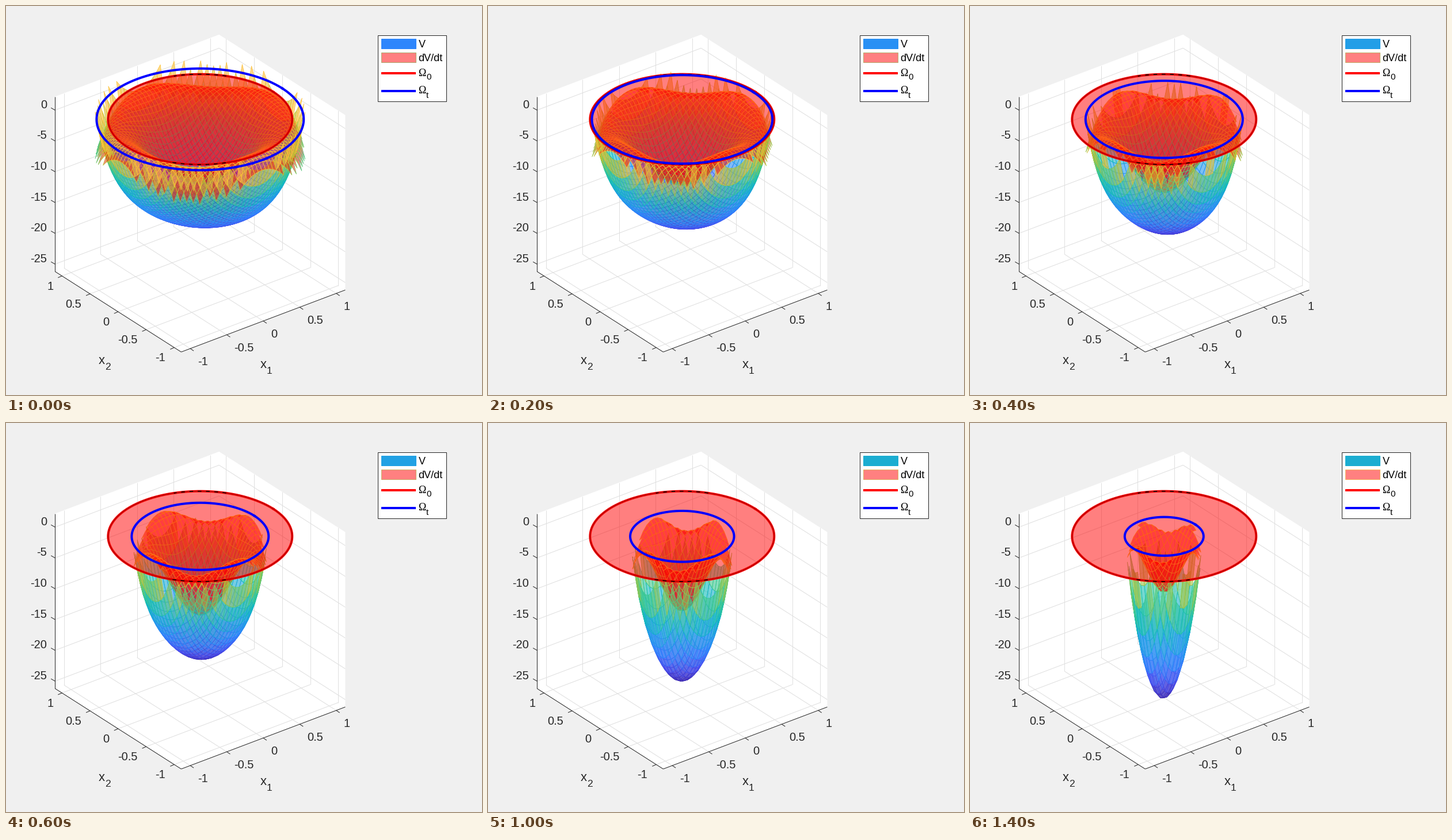
Recreate the animation shown at these times as a matplotlib script. Size 827 by 677 pixels, loop 1500 ms.

```python
import numpy as np
import matplotlib.pyplot as plt
from matplotlib.animation import FuncAnimation
from matplotlib.collections import LineCollection, PolyCollection
from matplotlib.colors import LinearSegmentedColormap
from matplotlib.patches import Polygon, Rectangle

W, H, DPI = 827, 677, 100
PX = 72 / DPI                      # one pixel in points
FRAMES, INTERVAL = 15, 100
INK, GRID = "#262626", "#dfdfdf"
LIM, ZLO, ZHI = 1.124, -26.2, 2.2

parula = LinearSegmentedColormap.from_list("parula", [
    (.243, .150, .660), (.282, .310, .950), (.180, .525, .990),
    (.132, .625, .900), (.070, .746, .726), (.290, .795, .515),
    (.750, .760, .190), (.995, .750, .235), (.977, .984, .082)])

plt.rcParams["font.family"] = "Liberation Sans"
fig = plt.figure(figsize=(W / DPI, H / DPI), dpi=DPI, facecolor="#f0f0f0")
ax = fig.add_axes([0, 0, 1, 1])
ax.set_xlim(0, W)
ax.set_ylim(H, 0)
ax.axis("off")


def project(x, y, z):
    """Orthographic view of data space, in pixels."""
    return np.stack([337.3 + 126.8 * x - 97.5 * y,
                     197.3 - 48.0 * x - 62.3 * y - 10.72 * z], axis=-1)


def view_plane(x, y):
    """Rightward and rearward coordinates as seen on screen."""
    return (126.8 * x - 97.5 * y) / 160, (48.0 * x + 62.3 * y) / 78.75


def text(x, y, s, px, ha="left", va="center", **kw):
    ax.text(x, y, s, fontsize=px * PX, ha=ha, va=va, color=kw.pop("color", INK), **kw)


def segment(a, b):
    return [project(*a), project(*b)]


def draw_box():
    corners = [(-LIM, LIM, ZHI), (LIM, LIM, ZHI), (LIM, -LIM, ZHI),
               (LIM, -LIM, ZLO), (-LIM, -LIM, ZLO), (-LIM, LIM, ZLO)]
    outline = [project(*c) for c in corners]
    ax.add_patch(Polygon(outline, fc="white", ec="none", zorder=0))

    grid = []
    for t in np.arange(-1, 1.1, .5):
        grid += [segment((t, -LIM, ZLO), (t, LIM, ZLO)),
                 segment((-LIM, t, ZLO), (LIM, t, ZLO)),
                 segment((t, LIM, ZLO), (t, LIM, ZHI)),
                 segment((LIM, t, ZLO), (LIM, t, ZHI))]
    for z in range(-25, 1, 5):
        grid += [segment((-LIM, LIM, z), (LIM, LIM, z)),
                 segment((LIM, LIM, z), (LIM, -LIM, z))]
    ax.add_collection(LineCollection(grid, colors=GRID, lw=PX, zorder=1))

    edges = [[outline[0], outline[5]], [outline[5], outline[4]],
             [outline[4], outline[3]]]
    for t in np.arange(-1, 1.1, .5):
        label = f"{t:g}"
        p = project(t, -LIM, ZLO)
        edges.append([p, p + (6, 4)])
        text(p[0] + 13, p[1] + 23, label, 20)
        p = project(-LIM, t, ZLO)
        edges.append([p, p + (-7, 3)])
        text(p[0] - 15, p[1] + 18.5, label, 20, "right")
    for z in range(-25, 1, 5):
        p = project(-LIM, LIM, z)
        edges.append([p, p + (-7, -4)])
        text(71, p[1] - 9, str(z), 20, "right")
    ax.add_collection(LineCollection(edges, colors=INK, lw=PX, zorder=2))

    for x, y, sub in [(442, 630, "1"), (161, 623, "2")]:
        text(x, y, "x", 22, va="baseline")
        text(x + 11, y + 10, sub, 17.5, va="baseline")


def draw_legend():
    ax.add_patch(Rectangle((646, 51), 119, 115, fc="white", ec=INK, lw=PX))
    keys = [ax.add_patch(Rectangle((651.5, y), 60.5, 17, lw=PX, zorder=3))
            for y in (57, 81)]
    text(716.5, 72, "V", 18, va="baseline", color="black")
    text(716.5, 96, "dV/dt", 18, va="baseline", color="black")
    for y, color, sub in [(116.5, "red", "0"), (147.5, "blue", "t")]:
        ax.plot([652, 712], [y, y], color=color, lw=4 * PX,
                solid_capstyle="butt", zorder=3)
        text(716.5, y + 5, "Ω", 18, va="baseline", color="black",
             family="Liberation Serif")
        text(730, y + 12, sub, 15, va="baseline", color="black")
    return keys


draw_box()
key_v, key_w = draw_legend()
key_w.set_facecolor("#ff8080")

# Surfaces below the disc, then raised teeth behind and before the rings.
low, rear, front = [ax.add_collection(PolyCollection([], lw=.8 * PX, zorder=z))
                    for z in (4, 6, 9)]

turn = np.linspace(0, 2 * np.pi, 361)
ring = project(np.cos(turn), np.sin(turn), 0)
ax.add_patch(Polygon(ring, fc=(1, 0, 0, .5), ec="none", zorder=5))
ax.plot(*ring.T, color="red", lw=4 * PX, zorder=7)
ax.plot(*ring.T, color="black", lw=1.2 * PX, alpha=.4, zorder=7.1)
polar = np.where(np.abs(ring[:, 1:] - 197) > 75, ring, np.nan)
ax.plot(*polar.T, color="black", lw=1.6 * PX, dashes=(4, 5), zorder=7.2)
rim, = ax.plot([], [], color="blue", lw=4 * PX, zorder=8)

line = np.linspace(-1.2, 1.2, 49)
X, Y = np.meshgrid(line, line)
U, D = view_plane(X, Y)
RADIUS, ANGLE = np.hypot(X, Y), np.arctan2(D, U)

KEYS = [0, 2, 4, 6, 8, 10, 14]


def at(k, *values):
    return np.interp(k, KEYS, values)


def surfaces(k, radius):
    """Heights of V and dV/dt on the grid at step k."""
    q = (RADIUS / radius) ** 2
    depth = at(k, 15.1, 16.25, 17.7, 19.4, 21.4, 23.3, 26.2)
    tilt = at(k, .95, 1, 1.2, .6, 0, -.7, -3)
    s = .43 + .034 * k
    v = depth * (s * q + (1 - s) * q ** 4 - 1) - tilt * U * (1 - q)

    # dV/dt climbs from its dip to four humps just inside the rim.
    dip = at(k, 9.8, 10.2, 11.6, 12.6, 12.5, 12, 9)
    wave = at(k, 2.8, 3.5, 4, 4.5, 5, 5.5, 4)
    curl = at(k, 2, 1, .4, 0, 0, 0, 0)
    psi = ANGLE - np.radians(84)
    lobes = (1 + np.cos(4 * psi) - .3 * np.cos(2 * psi)) / 2
    w = -dip * (1 - q / .8) ** 2 - wave * lobes * q ** 2 - curl * q ** 6
    return v, w, depth


def corners(a):
    return np.stack([a[:-1, :-1], a[:-1, 1:], a[1:, 1:], a[1:, :-1]], axis=-1)


def update(k):
    radius = 1.125 * np.exp(-.069 * k)
    v, w, depth = surfaces(k, radius)
    keep = corners(RADIUS < radius * (1.02 - .005 * k)).all(axis=-1)
    cx, cy = corners(X)[keep], corners(Y)[keep]

    quads, faces, edges, heights = [], [], [], []
    for surface in (v, w):
        cz = corners(surface)[keep]
        z = cz.mean(axis=1)
        color = parula((z + depth) / (depth + 1))
        face = color.copy()
        if surface is w:
            face[:, :3] = 1, 0, 0
        face[:, 3] = .5 if surface is w else .6
        quads.append(project(cx, cy, cz))
        faces.append(face)
        edges.append(color)
        heights.append(z)
    quads, faces, edges, z = map(np.concatenate, (quads, faces, edges, heights))

    back = np.tile(view_plane(cx, cy)[1].mean(axis=1), 2)
    order = np.argsort(-.87 * back + .038 * z)
    quads, faces, edges, z, back = (a[order] for a in (quads, faces, edges, z, back))
    for group, pick in [(low, z <= 0), (rear, (z > 0) & (back > 0)),
                        (front, (z > 0) & (back <= 0))]:
        group.set_verts(quads[pick])
        group.set_facecolor(faces[pick])
        group.set_edgecolor(edges[pick])

    rim.set_data(*project(radius * np.cos(turn), radius * np.sin(turn), 0).T)
    tone = parula(at(k, .25, .30, .37, .38, .42, .43, .43))
    key_v.set_facecolor(tone)
    key_v.set_edgecolor(tone)
    key_w.set_edgecolor((.67 + .02 * k, .67 + .003 * k, .43 - .005 * k))
    return low, rear, front, rim, key_v, key_w


anim = FuncAnimation(fig, update, frames=FRAMES, interval=INTERVAL,
                     repeat=True, repeat_delay=0, blit=False)
plt.show()
```
